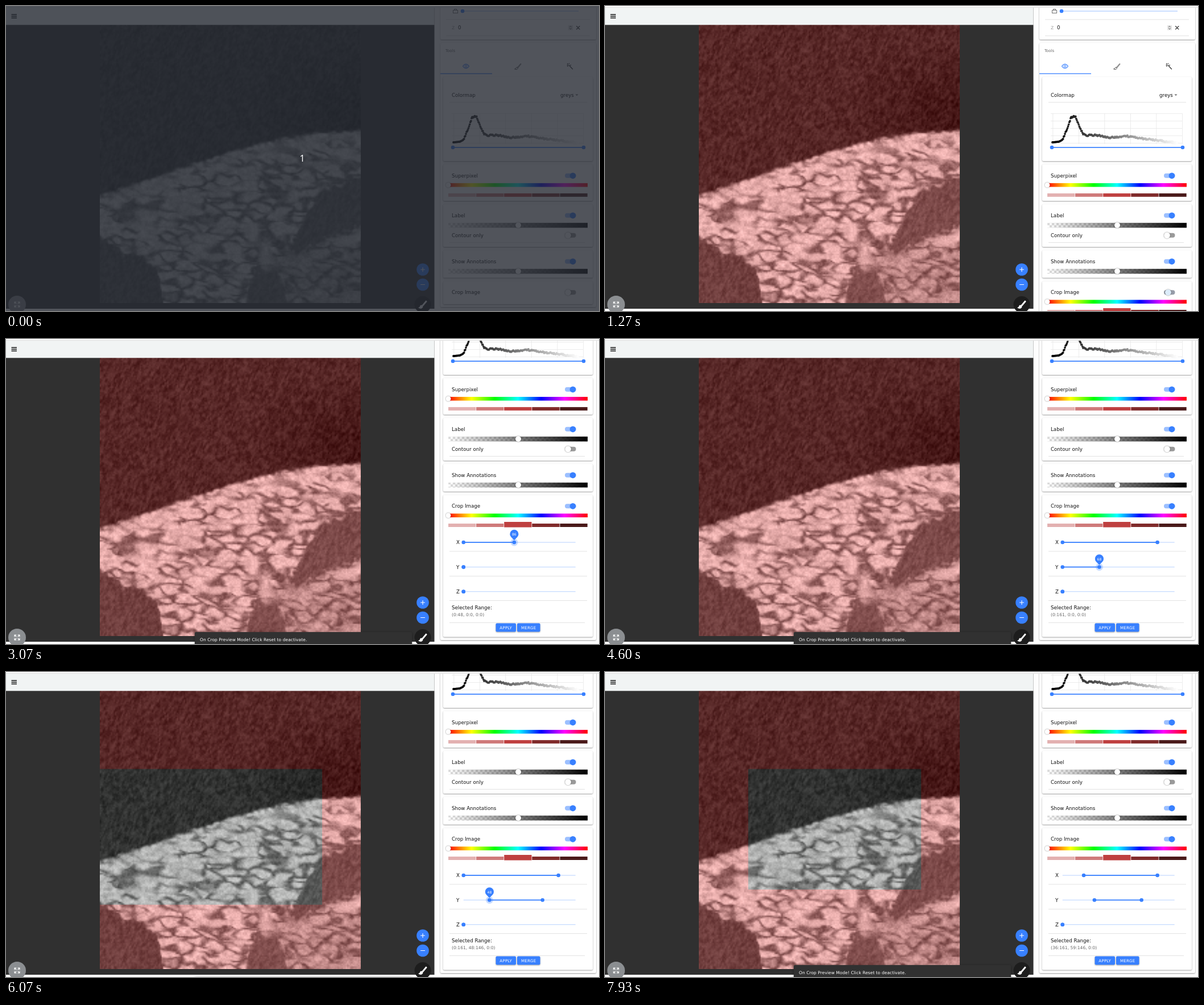
An HTML page with a canvas for the animation above (8000 ms loop, 1043x537 px).

```html
<!DOCTYPE html>
<html lang="en">
<head>
<meta charset="utf-8">
<title>Crop preview</title>
<style>
  html, body { margin: 0; width: 100%; height: 100%; overflow: hidden; background: #303030; }
  canvas { position: absolute; left: 165px; top: 33px; width: 458.6px; height: 490px; }
  svg { position: absolute; left: 0; top: 0; }
  text { font-family: "DejaVu Sans", sans-serif; font-size: 8.6px; letter-spacing: .05px; fill: #111; }
  .card { fill: #fff; filter: drop-shadow(0 1px 1px rgba(0,0,0,.38)); }
  .small { font-size: 7.5px; }
  .mid { text-anchor: middle; }
  .icon { fill: none; stroke: #333; stroke-width: 1.1; stroke-linecap: round; stroke-linejoin: round; }
  .knob { filter: drop-shadow(0 .6px .8px rgba(0,0,0,.45)); }
</style>
</head>
<body>
<canvas id="red"></canvas>
<canvas id="grey"></canvas>
<svg id="ui" width="1043" height="537" viewBox="0 0 1043 537"></svg>
<script>
const LOOP = 8000, TICK = 200 / 3, BLUE = '#3880ff';
const PX = 458.6 / 190, FLOOR = 525.5;
const $ = id => document.getElementById(id);
const clamp = v => Math.max(0, Math.min(1, v));
const smooth = v => (v = clamp(v), v * v * (3 - 2 * v));

// Piecewise linear curve through [x, y] points.
function along(points, x) {
  if (x <= points[0][0]) return points[0][1];
  for (let i = 1; i < points.length; i++) {
    const [x0, y0] = points[i - 1], [x1, y1] = points[i];
    if (x <= x1) return y0 + (y1 - y0) * (x - x0) / (x1 - x0);
  }
  return points[points.length - 1][1];
}
// Last value whose time has come.
const latest = (steps, t) => steps.reduce((v, [at, next]) => t >= at ? next : v, 0);

// ---- scan texture ----
const hash = (x, y) => { const s = Math.sin(x * 127.1 + y * 311.7) * 43758.5453; return s - Math.floor(s); };
function noise(x, y) {
  const i = Math.floor(x), j = Math.floor(y), a = smooth(x - i), b = smooth(y - j);
  const top = hash(i, j) * (1 - a) + hash(i + 1, j) * a;
  const low = hash(i, j + 1) * (1 - a) + hash(i + 1, j + 1) * a;
  return top * (1 - b) + low * b;
}
function cellGap(x, y) {
  const i = Math.floor(x), j = Math.floor(y);
  let near = 9, next = 9;
  for (let a = i - 1; a <= i + 1; a++) for (let b = j - 1; b <= j + 1; b++) {
    const d = Math.hypot(a + hash(a, b) - x, b + hash(a + 57, b + 31) - y);
    if (d < near) { next = near; near = d; } else if (d < next) next = d;
  }
  return next - near;
}
const skin = [[165, 328], [230, 307], [300, 282], [370, 259], [440, 238], [480, 229], [530, 220], [580, 216], [624, 215]];
const wedgeTop = [[478, 440], [505, 405], [522, 370], [545, 327], [560, 313], [600, 298], [624, 289]];
const wedgeLow = [[478, 440], [500, 450], [540, 432], [580, 415], [624, 398]];
const leftBlob = [[165, 398], [185, 408], [205, 428], [240, 432], [262, 452], [272, 490], [276, 523], [285, 600]];
const midBlob = [[415, 540], [428, 475], [440, 452], [470, 450], [485, 480], [498, 535]];

function shade(u, v) {
  const grain = hash(u, v) - .5;
  const streak = noise((u * .9 + v * .44) / 3, (v * .9 - u * .44) / 6.5) - .5;
  const rough = noise(u / 6, v / 5) - .5;
  const depth = v - along(skin, u);
  const air = 49 - 16 * smooth((u - 400) / 220) * smooth((v - 60) / 120) + streak * 32 + grain * 13;

  const wx = u + 22 * (noise(u / 20, v / 11) - .5), wy = v + 11 * (noise(u / 15 + 40, v / 12) - .5);
  const ridge = 1 - smooth(cellGap(wx / 38, (wy - .14 * wx) / 15) / .5);
  const broken = smooth((noise(u / 24 + 9, v / 11) - .12) / .5);
  const corner = smooth((u - 440) / 60) * smooth((v - 400) / 50);
  const crack = ridge * broken * (.45 + .55 * smooth(depth / 40)) * (1 - .3 * corner);
  let flesh = 184 - 32 * corner - 92 * crack + rough * 38 + grain * 24;

  const darken = (mask, level) => { flesh += (level + streak * 30 + grain * 14 - flesh) * mask; };
  const wobble = rough * 18;
  darken(smooth((v - along(wedgeTop, u) + wobble) / 14) * smooth((along(wedgeLow, u) - v + wobble) / 20), 84);
  darken(smooth((v - along(leftBlob, u) + wobble) / 15), 72);
  darken(smooth((v - along(midBlob, u) + wobble) / 18) * .9, 82);
  return air + (flesh - air) * smooth((depth + rough * 5) / 9);
}
function paintScan() {
  const w = 190, h = 203;
  const layers = [['grey', g => [g, g + 1, g]], ['red', g => [1.1 * g + 33, 1.02 * g - 11, 1.01 * g - 11]]].map(([id, tint]) => {
    const c = $(id); c.width = w; c.height = h;
    const ctx = c.getContext('2d');
    return { ctx, tint, img: ctx.createImageData(w, h) };
  });
  for (let j = 0; j < h; j++) for (let i = 0; i < w; i++) {
    const g = shade(165 + i * PX, 33 + j * PX);
    for (const { tint, img } of layers) img.data.set([...tint(g), 255], (j * w + i) * 4);
  }
  for (const { ctx, img } of layers) ctx.putImageData(img, 0, 0);
}

// ---- interface ----
const rect = (x, y, w, h, fill, more = '') => `<rect x="${x}" y="${y}" width="${w}" height="${h}" fill="${fill}" ${more}/>`;
const card = (x, y, w, h, more = '') => `<rect class="card" x="${x}" y="${y}" width="${w}" height="${h}" rx="2" ${more}/>`;
const dot = (x, y, r, fill, more = '') => `<circle cx="${x}" cy="${y}" r="${r}" fill="${fill}" ${more}/>`;
const label = (x, y, s, more = '') => `<text x="${x}" y="${y + 3}" ${more}>${s}</text>`;
const rule = (x, y, w) => rect(x, y, w, .8, '#dcdcdc');
const icon = (d, more = '') => `<path class="icon" d="${d}" ${more}/>`;
const toggle = (y, on) => rect(983, y - 4, 19.5, 8, on ? '#9bbfff' : '#9a9a9a', 'rx="4"') +
  (on ? dot(997, y, 5.4, BLUE) : dot(988.5, y, 5.4, '#fff', 'class="knob"'));
const hueBar = y => rect(778, y - 3.3, 245, 6.6, 'url(#hue)') + dot(778, y, 4.4, '#fff', 'class="knob"');
const alphaBar = y => rect(778, y - 4.2, 245, 8.6, 'url(#check)') + rect(778, y - 4.2, 245, 8.6, 'url(#fade)') + dot(901, y, 5, '#fff', 'class="knob"');
const swatches = (y, raised) => ['#e3b1b1', '#cf7a7a', '#bf4040', '#802b2b', '#4a1a1a'].map((c, i) => {
  const up = raised && i === 2;
  return rect(778 + i * 49.1, y - (up ? 6 : 3), 48.3, up ? 9.5 : 6, c);
}).join('');
const button = (x, w, s) => rect(x, 710.5, w, 15, BLUE, 'rx="2" style="filter:drop-shadow(0 1px 1px rgba(0,0,0,.35))"') +
  label(x + w / 2, 717.7, s, 'class="mid" style="font-size:7.1px;letter-spacing:.2px;fill:#fff"');

function histogram() {
  const shape = [[787, 240], [798, 239], [804, 236], [809, 226], [814, 212], [819, 198], [823, 194], [827, 194], [830, 202],
    [835, 213], [840, 224], [847, 228], [864, 227], [885, 232], [900, 231], [918, 229], [935, 232], [965, 236], [1008, 241]];
  let out = '';
  for (let i = 0; i < 6; i++) out += rect(787.5 + i * 45.5, 189, .7, 54, '#e4e4e4');
  for (let i = 0; i < 5; i++) out += rect(784, 189 + i * 13, 231, .7, '#e4e4e4');
  for (let x = 787; x < 1008; x += 1.1) {
    const g = Math.round(255 * Math.pow((x - 787) / 221, 1.1));
    out += dot(x.toFixed(1), (along(shape, x) + (x > 805 ? hash(x, 3) * 3 - 1.5 : 0)).toFixed(1), 1.9, `rgb(${g},${g},${g})`);
  }
  return out + rect(786, 248.2, 230, 1.7, BLUE) + dot(786, 249, 3.3, BLUE) + dot(1016, 249, 3.3, BLUE);
}

const sliders = [['x', 568, 190], ['y', 611.5, 207], ['z', 654.7, 1]];
const sliderX = (v, max) => 804.7 + 197 * v / max;
const sliderMarkup = ([id, y]) => label(792, y, id.toUpperCase()) + rect(804.7, y - .6, 197, 1.2, '#c3d9ff') +
  rect(804.7, y - .9, 0, 1.8, BLUE, `id="${id}Bar"`) + dot(804.7, y, 3.3, BLUE, `id="${id}Lo"`) + dot(804.7, y, 3.3, BLUE, `id="${id}Hi"`) +
  rule(780, y + 15.5, 242);

const brush = 'M-5.500 4.500q2 -.3 2 -2q1 -2 2.800 -.5q1.200 2 -.8 3q-2 .8 -4 -.5zM-.6 1.200L4.600 -5L5.500 -4.200L.4 1.900z';

$('ui').innerHTML = `
<defs>
  <linearGradient id="hue">${[0, 60, 120, 180, 240, 300, 360].map(h => `<stop offset="${h / 360}" stop-color="hsl(${h},100%,50%)"/>`).join('')}</linearGradient>
  <linearGradient id="fade"><stop stop-opacity="0"/><stop offset="1"/></linearGradient>
  <pattern id="check" width="8" height="8" x="778" y="382" patternUnits="userSpaceOnUse">${rect(0, 0, 8, 8, '#fff') + rect(0, 0, 4, 4, '#ddd') + rect(4, 4, 4, 4, '#ddd')}</pattern>
  <clipPath id="side">${rect(754, 3, 289, 534, '#000')}</clipPath>
</defs>
${rect(0, 0, 1043, 3, '#fff') + rect(0, 3, 753.5, 30.3, '#f1f4f4') + rect(0, 533, 754, 4, '#fff')}
${icon('M9.500 15h9.500M9.500 18h9.500M9.500 21h9.500', 'style="stroke:#111;stroke-width:1.400;stroke-linecap:butt"')}
<text id="status" x="0" y="541.500" style="font-size:7px">x: 0, y: 0</text>
${rect(753.5, 0, 290, 537, '#fdfdfd')}
<g clip-path="url(#side)"><g id="scroll">
  ${card(764, -10, 274, 69)}
  ${icon('M786.500 7.500h8v5h-8zM788.500 7.500v-2h4v2', 'style="stroke:#777"') + rect(803, 8.4, 204, 1.2, '#a9c8ff') + dot(803, 9, 3.3, BLUE)}
  ${rule(774, 23.500, 253) + rule(774, 52, 253) + label(784, 38, 'Z', 'class="small" style="fill:#999"') + label(795, 38, '0')}
  ${rect(989, 34, 8, 8.500, '#e4e4e4') + icon('M991.500 37l1.500 -1.500l1.500 1.500M991.500 39.500l1.500 1.500l1.500 -1.500', 'style="stroke-width:.8"') + icon('M1003.500 35.500l5.500 5.500m0 -5.500l-5.500 5.500')}
  ${card(764, 65, 274, 465, 'id="panel"') + label(773, 78, 'Tools', 'style="font-size:6.9px;fill:#666"')}
  ${icon('M803.500 106q5.500 -7.500 11 0q-5.500 7.500 -11 0z', `style="stroke:${BLUE}"`) + dot(809, 106, 1.8, 'none', `stroke="${BLUE}"`)}
  ${icon(brush, 'transform="translate(900.500 106.500)" style="stroke-width:.8"')}
  ${icon('M990.500 104.500L996.500 111M987.500 106l1.500 -1M987.500 101.500l1 1M992.500 104.500l1 -.5M990.500 101v1M987 104h1', 'style="stroke-width:1.200"')}
  ${rect(764, 118.5, 91, 1.3, BLUE)}
  ${card(769, 125, 263, 148) + label(784, 156.500, 'Colormap') + label(975, 156.500, 'greys')}<path d="M1001.500 155.500h5l-2.500 2.500z" fill="#666"/>
  ${rule(780, 169, 242) + histogram()}
  ${card(769, 278.500, 263, 64.500) + label(784, 298.500, 'Superpixel') + toggle(298.800, true) + hueBar(315.200) + swatches(332.900)}
  ${card(769, 349, 263, 75) + label(784, 368.500, 'Label') + toggle(368.800, true) + alphaBar(386) + label(784, 403.500, 'Contour only') + toggle(403.800) + rule(780, 416, 238)}
  ${card(769, 430, 263, 48.500) + label(784, 449.500, 'Show Annotations') + toggle(449.800, true) + alphaBar(467)}
  ${card(769, 484.500, 263, 40.500, 'id="cropCard"') + label(784, 504, 'Crop Image')}
  ${rect(983, 500.3, 19.5, 8, '#9a9a9a', 'rx="4" id="cropTrack"') + dot(988.5, 504.3, 5.4, '#fff', 'class="knob" id="cropKnob"')}
  <g id="cropBody">
    ${hueBar(520.700) + swatches(538, true) + sliders.map(sliderMarkup).join('')}
    ${dot(0, 0, 6.5, BLUE, 'id="halo" fill-opacity=".28"')}
    <g id="pin"><path d="M0 -3.800L-5.400 -9.200A7.600 7.600 0 1 1 5.400 -9.200Z" fill="${BLUE}"/><text id="pinText" class="mid" y="-11.700" style="font-size:6px;fill:#fff;letter-spacing:0"></text></g>
    ${label(784, 683, 'Selected Range:') + label(784, 695, '', 'id="range" class="small" style="fill:#666"') + rule(780, 709, 238)}
    ${button(861.5, 35.5, 'APPLY') + button(899, 40.5, 'MERGE')}
  </g>
</g></g>
${rect(0, 2, 1043, .8, '#d5d5d5')}
${dot(733, 464, 10.800, BLUE) + dot(733, 490.500, 10.800, BLUE) + icon('M729.500 464h7M733 460.500v7M729.500 490.500h7', 'style="stroke:#fff"')}
${dot(733, 525.500, 14.500, '#1d1d1d') + icon(brush, 'transform="translate(733 525.500) scale(1.250)" style="stroke:#fff;fill:#fff"')}
${dot(19.500, 525.500, 15.500, '#8b8e91') + icon('M15 524v-3h3M21 521h3v3M24 527v3h-3M18 530h-3v-3M15 521l3 3M24 521l-3 3M24 530l-3 -3M15 530l3 -3', 'style="stroke:#fff"')}
<g id="toast">${rect(332, 516, 382, 24, '#313131', 'rx="2" style="filter:drop-shadow(0 1px 2px rgba(0,0,0,.4))"') + label(341, 528.500, 'On Crop Preview Mode! Click Reset to deactivate.', 'class="small" style="fill:#fff"')}</g>
<g id="veil">${rect(0, 0, 1043, 537, '#262a32', 'fill-opacity=".8"')}<text class="mid" x="521" y="274" style="font:16px 'Noto Sans',sans-serif;fill:#fff">1</text></g>`;

// ---- motion ----
const handles = {
  xHi: [[2467, 0], [3067, 86], [3333, 131], [3667, 158], [3867, 161]],
  yHi: [[4267, 0], [4600, 68], [4933, 115], [5133, 132], [5467, 146]],
  yLo: [[5867, 0], [6067, 48], [6400, 57], [6667, 59]],
  xLo: [[6733, 0], [7067, 36], [7200, 50], [7467, 36]]
};
// Selection follows the handles with a throttle.
const applied = {
  xHi: [[2860, 48], [3190, 107], [3530, 149], [3860, 161]],
  yHi: [[4660, 68], [4990, 115], [5330, 140], [5660, 146]],
  yLo: [[6060, 48], [6390, 57], [6720, 59]],
  xLo: [[6990, 24], [7260, 46], [7520, 36]]
};
// handle, drag start, drag end, hover end
const drags = [['xHi', 2530, 3860, 4330], ['yHi', 4330, 5660, 5930], ['yLo', 5930, 6725, 6795], ['xLo', 6795, 7525, 7930]];
const toastLift = [[2800, 0], [3000, 1], [5467, 1], [5667, 0], [6040, 0], [6250, 1]];

const set = (id, attrs) => { for (const k in attrs) $(id).setAttribute(k, attrs[k]); };
const show = (id, on) => { $(id).style.display = on ? '' : 'none'; };

function draw(time) {
  const t = Math.floor((time + 4) / TICK) * TICK;
  const cropping = t > 1260;
  show('veil', t < 60);
  show('status', t > 1260 && t < 5930);

  const on = cropping ? clamp((t - 1230) / 160) : 0;
  set('cropKnob', { cx: 988.5 + 8.5 * on, fill: on > .9 ? BLUE : on > 0 ? '#dcecfa' : '#fff' });
  set('cropTrack', { fill: on > .9 ? '#9bbfff' : on > 0 ? '#979da9' : '#9a9a9a' });
  $('cropKnob').style.filter = on > .9 ? 'none' : '';
  show('cropBody', cropping);
  set('cropCard', { height: cropping ? 250 : 40.5 });
  set('panel', { height: cropping ? 675 : 465 });
  set('scroll', { transform: `translate(0 ${-along([[1533, 0], [1733, 210]], t)})` });

  const value = {}, used = {};
  for (const k in handles) {
    value[k] = Math.round(along(handles[k], t));
    used[k] = latest(applied[k], t);
  }
  for (const [id, , max] of sliders) {
    const a = sliderX(value[id + 'Lo'] || 0, max), b = sliderX(value[id + 'Hi'] || 0, max);
    set(id + 'Lo', { cx: a });
    set(id + 'Hi', { cx: b });
    set(id + 'Bar', { x: a, width: b - a });
  }
  const ready = used.yHi > 68;
  const yHi = ready ? used.yHi : 0;
  $('range').textContent = `(${used.xLo}:${used.xHi}, ${used.yLo}:${yHi}, 0:0)`;

  const drag = drags.find(d => t >= d[1] - 5 && t < d[3] - 5);
  show('halo', drag);
  show('pin', drag && t < drag[2]);
  if (drag) {
    const [, y, max] = sliders.find(s => s[0] === drag[0][0]);
    const x = sliderX(value[drag[0]], max);
    set('halo', { cx: x, cy: y, r: 6.5 - 3.5 * clamp((t - 7620) / 260) });
    set('pin', { transform: `translate(${x} ${y})` });
    $('pinText').textContent = value[drag[0]];
  }

  const lift = along(toastLift, t);
  show('toast', lift > 0);
  set('toast', { transform: `translate(0 ${22 * (1 - smooth(lift))})` });

  const grey = $('grey').style, picked = used.xHi > 0 && yHi > 0;
  grey.visibility = !cropping || picked ? 'visible' : 'hidden';
  grey.clipPath = cropping && picked ? `inset(${[
    FLOOR - (yHi + 1) * PX - 33, 458.6 - (used.xHi + 1) * PX,
    Math.max(0, 523 - FLOOR + used.yLo * PX), used.xLo * PX].map(v => v + 'px').join(' ')})` : 'none';
}

paintScan();
draw(0);
const start = performance.now();
(function frame() {
  draw((performance.now() - start) % LOOP);
  requestAnimationFrame(frame);
})();
</script>
</body>
</html>
```
